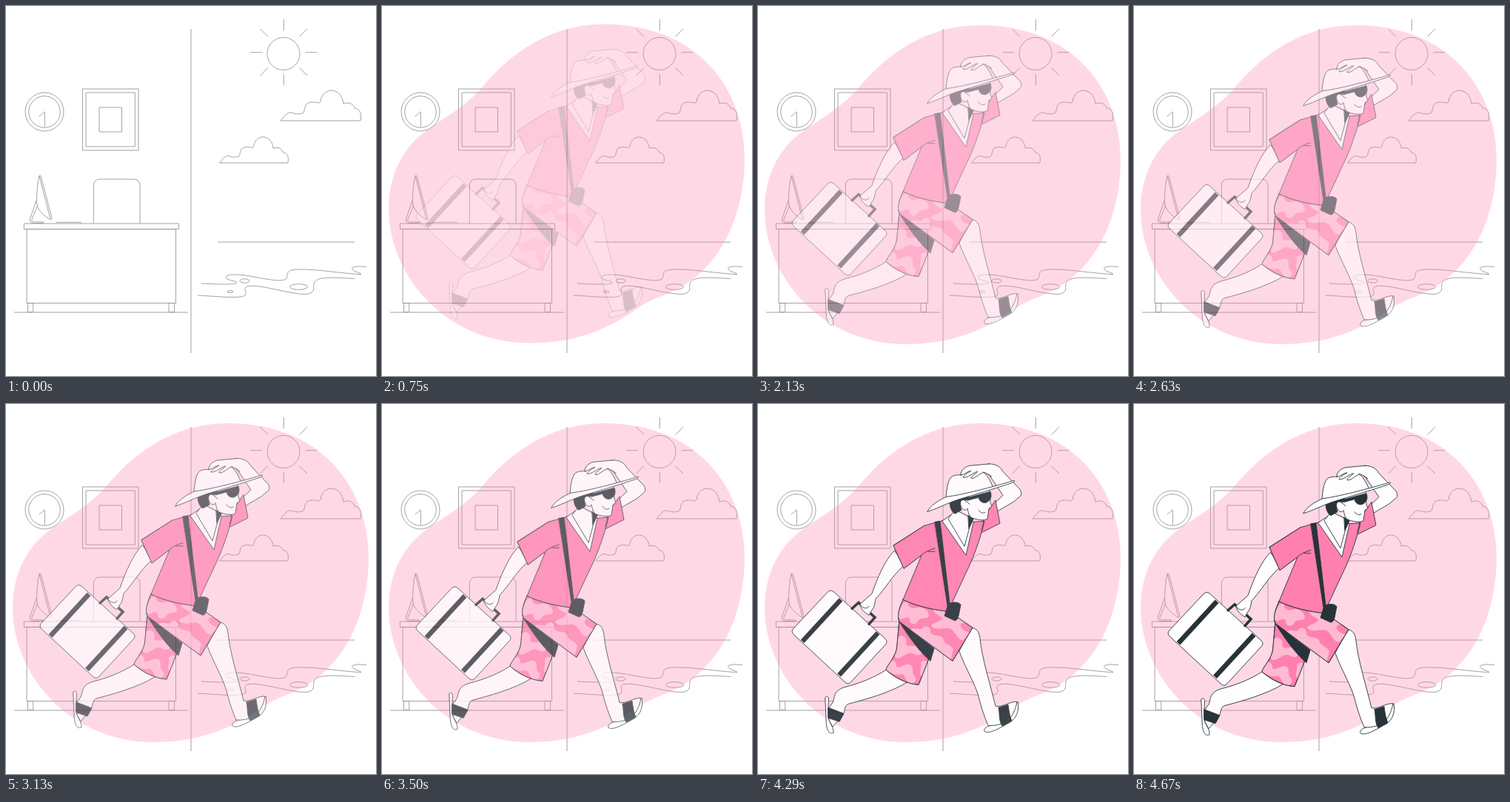
Recreate the animation shown at these times as an HTML page. Size 500 by 500 pixels, loop 4710 ms.

```html
<!DOCTYPE html>
<html lang="en">
<head>
<meta charset="utf-8">
<title>Off on holiday</title>
<style>
  html, body { margin: 0; width: 100%; height: 100%; overflow: hidden; background: #fff; }
  svg { display: block; width: 100vw; height: 100vh; }
  #scene { fill: none; stroke: #8c8c8c; stroke-width: .8; }
  #traveller { stroke: #263238; stroke-width: .9; stroke-linejoin: round; stroke-linecap: round; }
  .white { fill: #fff; }
  .pink { fill: #ff80ae; }
  .light { fill: #ffbad2; stroke: none; }
  .dark { fill: #263238; }
  .line { fill: none; }
</style>
</head>
<body>
<svg viewBox="0 0 500 500">
  <defs>
    <path id="cloud" vector-effect="non-scaling-stroke" d="M0 0C4-5 9-12 15-11C21-8 29-9 31-11C34-17 31-23 41-25C47-26 53-22 54-26C56-38 64-41 69-41C80-40 84-31 85-23C93-26 99-22 100-17C108-16 110-8 108 0Z"/>
    <path id="frontShort" d="M196 267C214 276 238 281 258 283L290 305L263 350L191 297C187 288 192 276 196 267Z"/>
    <path id="backShort" d="M191 297L237 335L230 349L217 382C202 381 185 373 173 362C174 355 188 344 188 328Z"/>
    <clipPath id="frontClip"><use href="#frontShort"/></clipPath>
    <clipPath id="backClip"><use href="#backShort"/></clipPath>
  </defs>

  <g id="scene">
    <path d="M250 31V469"/>
    <!-- office -->
    <circle cx="52" cy="143" r="26"/>
    <circle cx="52" cy="143" r="21.3"/>
    <path d="M44.5 149.5L52.3 143V163"/>
    <path d="M103.5 112H179V195H103.5ZM108 117H174.3V190H108ZM126 137H156.5V170H126Z"/>
    <path d="M118.3 293.5V242a8 8 0 0 1 8-8H173a8 8 0 0 1 8 8V293.5"/>
    <path d="M24.3 294H233.5V301.5H24.3ZM28 301.5H229.5V401.5H28ZM29.5 401.5H36.7V413.5H29.5ZM220 401.5H227.5V413.5H220ZM11 414H246"/>
    <path d="M45 229.5H47L62 287Q61 290 58.5 288C47 280 40 273 41.5 260Q42 241 45 229.5L60 288M41 263L32 289Q33 293.5 36 293.5H50.5V291.8H36Q34 291 35 288L43 269M68.5 293.5V292.3H101V293.5"/>
    <!-- seaside -->
    <circle cx="375" cy="64.5" r="22"/>
    <path d="M375.3 18V33M375.3 92V107M330 62.7H346M404.5 62.7H420M343.5 31L354 41.5M407 31L396.5 41.5M343.5 94L354 83.5M407 94L396.5 83.5"/>
    <use href="#cloud" x="371" y="155"/>
    <use href="#cloud" transform="translate(288.5 212) scale(.855)"/>
    <path d="M286 319H471"/>
    <path d="M264 375C285 376 310 377 312 374C312 371 296 371 297 366C300 361 320 363 335 366C352 369 375 374 379 368C382 361 377 357 394 356C420 355 455 362 480 362.5C476 359 466 358 468 354C471 351 480 352 487 352.5"/>
    <path d="M259 391C280 392 318 396 323 391C327 387 318 381 328 378.5C345 376 380 389 405 389.5C421 388 413 379 417 373C422 365 445 367 471 368.5"/>
    <ellipse cx="322.5" cy="371.5" rx="6.5" ry="2.7"/>
    <ellipse cx="303" cy="386" rx="4" ry="1.4"/>
    <ellipse cx="395.5" cy="379.5" rx="12" ry="3.8"/>
  </g>

  <path id="blob" fill="#ff80ae" d="M9 275C9 232 27 193 60 170C84 152 108 141 134 113C173 65 228 26 300 26C426 26 490 113 490 207C490 275 465 345 405 381C385 392 368 396 350 407C310 436 265 457 200 457C85 457 9 365 9 275Z"/>

  <g id="traveller">
    <!-- back leg and sandal -->
    <path class="white" d="M91 399C93 397 95.500 398 95.500 402C95 413 94 424 96 430C99 437 102 440 102 447C95 450 92 441 92 428Z"/>
    <path class="white" d="M173 362C158 372 138 380 118 385C101 390 104 400 101 406L95 414L96 430L101 439L115 422C118 417 116 411 122 408C145 402 178 393 201 379Z"/>
    <path class="dark" d="M95 413L116 421L110 432L95 427Z"/>
    <use href="#backShort" class="pink"/>
    <g class="light" clip-path="url(#backClip)">
      <path d="M188 318C196 312 203 320 200 327C203 333 214 326 221 332C226 338 219 345 212 341C204 336 199 343 191 346C185 348 182 342 188 334Z"/>
      <path d="M208 318C213 315 224 326 232 334L228 340C220 334 211 329 208 318Z"/>
      <path d="M174 351C182 346 188 351 187 357C190 362 199 352 206 355C212 360 206 366 212 371C216 376 210 383 204 380C198 374 199 367 192 368C184 370 178 364 172 362Z"/>
      <path d="M220 352C224 348 230 350 230 352L222 372C216 368 222 359 220 352Z"/>
    </g>
    <use href="#backShort" class="line"/>
    <path class="dark" d="M191 297L238 333L233 350C219 338 207 322 191 297Z"/>

    <!-- front leg and sandal -->
    <path class="white" d="M306 442C309 436 320 437 330 433C341 427 345 412 351 405C353 417 350 427 340 433C328 440 311 450 306 445Z"/>
    <path class="white" d="M272 337C281 361 294 382 298 398C302 414 307 428 311 437C322 438 333 435 341 427C347 418 349 411 350 405C341 404 331 413 321 411C313 378 303 348 300 320C299 311 296 306 289 305Z"/>
    <path class="dark" d="M325 413L338 409C339 417 340 424 343 431L330 438C325 430 327 421 325 413Z"/>

    <use href="#frontShort" class="pink"/>
    <g class="light" clip-path="url(#frontClip)">
      <path d="M203 268C201 276 207 280 214 278C222 275 230 281 231 288C230 295 222 290 217 295C213 303 205 300 205 295C206 289 198 291 194 294L186 290L196 272Z"/>
      <path d="M206 308C211 303 218 309 222 306C226 299 234 304 233 311C236 318 245 313 250 319C251 327 259 327 264 334L260 350Z"/>
      <path d="M236 278C236 287 245 287 249 292C246 299 235 297 234 303C240 310 252 304 259 306C267 309 268 321 277 322L286 312C277 309 271 304 275 299C282 297 286 302 290 305L270 288C264 294 257 289 254 282Z"/>
    </g>
    <use href="#frontShort" class="line"/>

    <!-- raised arm -->
    <path class="white" d="M314 142L331 126L312 98L300 88L312 83.500C322 84 327 87 331 94L354 118C357 123 356 127 352 129C343 138 335 140 325 147Z"/>
    <path class="pink" d="M321 133L327 164L299 178L305 156Z"/>

    <!-- shirt, neck and collar -->
    <path class="pink" d="M225 167L257 158L290 162L306 161C300 187 290 213 281 231L260 276L258 283C238 281 214 276 196 267L221 207L197 225L183 194Z"/>
    <path class="line" d="M220 207C226 203 232 199 239 198M239 202L230 202M305 161L302 174"/>
    <path class="white" d="M249 161L281 207L291 163L286 158L262 152Z"/>
    <path class="white" d="M257 158L279 195L286 169L291 158L267 146Z"/>
    <path class="dark" d="M284 153L291 158L285 171Z"/>

    <!-- shoulder bag -->
    <path class="dark" d="M239 162L246 161L259 272C265 270 271 270 274 274L271 289C270 293 268 296 265 295L252 289L256 276Z"/>

    <!-- head -->
    <path class="white" stroke="none" d="M274 130L313 117L314 136L316 141L312 144L310 158C305 161 295 159 288 156L276 146Z"/>
    <path class="line" d="M313 120L314 136L316 141L312 144L310 158C305 161 295 159 288 156C285 153 284 149 283 144"/>
    <path class="dark" d="M259 134L288 124L281 133C275 131 272 138 275 146L266 151C261 148 259 141 259 134Z"/>
    <path class="white" d="M281 134C276 129 271 135 275 142C277 146 281 148 283 144"/>
    <path class="dark" d="M281 130L299 125L314 121C317 129 313 134 308 136C302 137 299 133 298 129L283 133Z"/>
    <path class="line" d="M298 146C301 150 304 151 307 149M281 134L286 138"/>

    <!-- hat and hand -->
    <path class="white" d="M254 129C255 116 257 103 263 100C270 97 276 100 281 97C290 92 299 92 303 94C310 98 314 107 318 116C300 122 275 129 254 131Z"/>
    <path class="white" d="M229 148C231 141 245 132 255 128C280 125 330 111 346 106C348 107 345 108 344 109C320 117 290 126 270 132C255 137 240 145 229 148Z"/>
    <path class="white" stroke="none" d="M275 98C274 93 281 87 286 86L313 84L318 100L304 94L288 104L278 102Z"/>
    <path class="line" d="M313 83.500L286 86C280 87 273 93 274 99C279 98 282 94 288 93C283 96 278 99 277 102C284 103 290 95 297 94C293 98 288 100 288 103C294 104 299 96 306 95L316 101"/>

    <!-- suitcase and carrying arm -->
    <path class="white" d="M95 256Q99 253 103 257L172 320Q176 324 172 328L126 378Q122 383 117 378L48 314Q44 310 48 306Z"/>
    <path class="line" stroke-width="6.500" stroke-linecap="butt" d="M112 267L60 323.500M162 312L109.500 369"/>
    <path class="line" stroke-width="3.500" stroke-linejoin="miter" d="M127 279L136 271L158 291L150 300"/>
    <path class="white" d="M184 201C172 213 161 238 154 259L138 273C139 281 145 285 150 288L154 281C157 278 158 272 159 266C170 255 182 234 196 222L188 206Z"/>
    <path class="pink" d="M221 207L197 225L183 194L225 167" stroke-linejoin="round"/>
    <path class="line" d="M139 275C142 279 148 280 150 276"/>
  </g>
</svg>
<script>
const LOOP = 4710, FIRST_CHANGE = 170, BLOB_TIME = 1000, OFFSET = 30, BLOB_ALPHA = .31;
const blob = document.getElementById('blob');
const traveller = document.getElementById('traveller');

function bezier(x1, y1, x2, y2) {
  const at = (a, b, s) => 3 * (1 - s) ** 2 * s * a + 3 * (1 - s) * s * s * b + s ** 3;
  return x => {
    let low = 0, high = 1;
    for (let i = 0; i < 24; i++) {
      const mid = (low + high) / 2;
      if (at(x1, x2, mid) < x) low = mid; else high = mid;
    }
    return at(y1, y2, low);
  };
}

const overshoot = bezier(.36, -.01, .5, 1.38);

function place(element, y, alpha) {
  element.setAttribute('transform', `translate(0 ${y})`);
  element.style.opacity = Math.max(0, Math.min(1, alpha));
}

function draw(now) {
  const t = now % LOOP;
  const shown = t >= FIRST_CHANGE ? 1 : 0;
  const rise = t < BLOB_TIME ? overshoot(t / BLOB_TIME) : 1;
  const fall = t / LOOP;
  place(blob, OFFSET * (1 - rise), shown * BLOB_ALPHA * Math.min(1, rise));
  place(traveller, OFFSET * (fall - 1), shown * fall);
  requestAnimationFrame(draw);
}

draw(performance.now());
</script>
</body>
</html>
```
